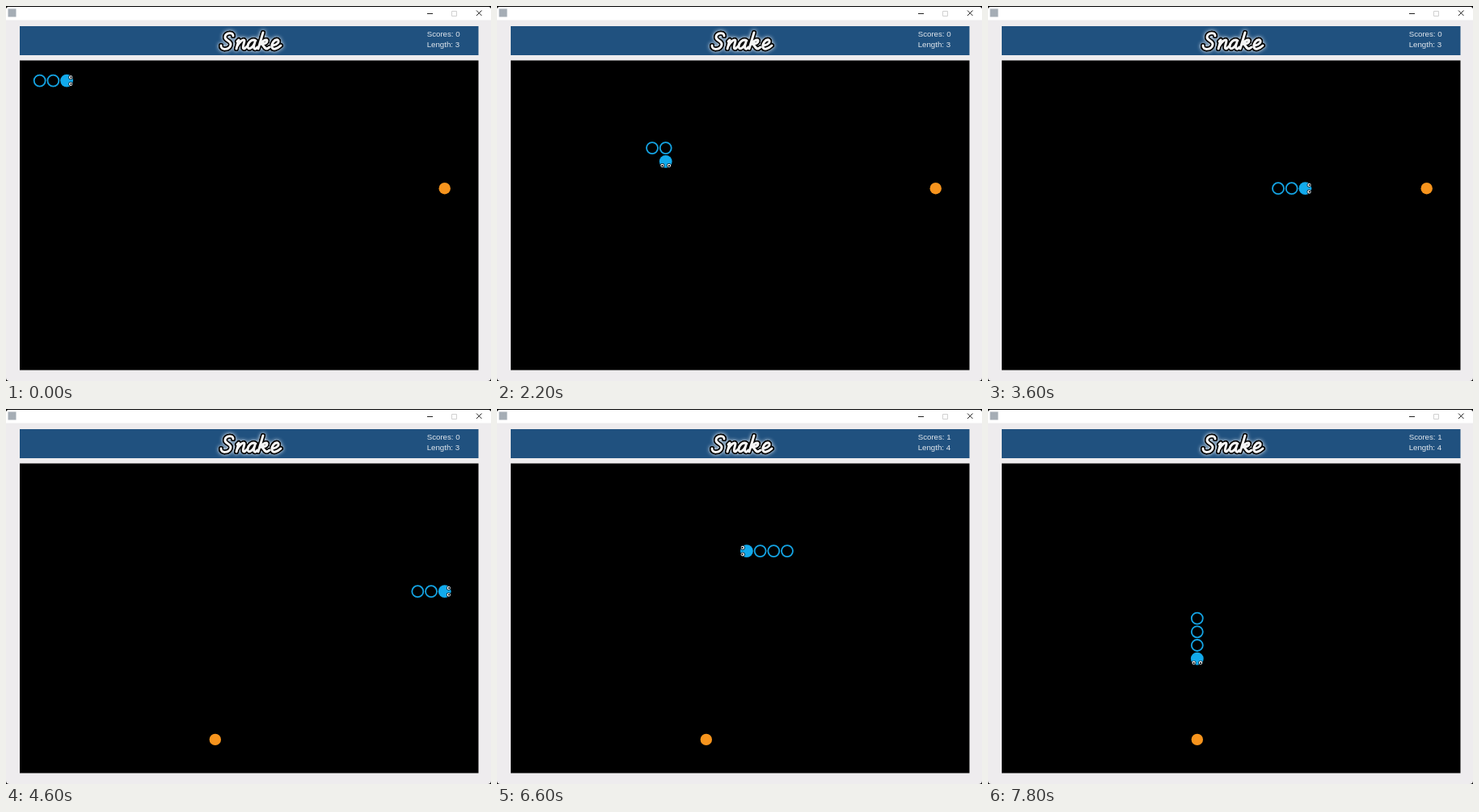
These frames come from a looping animation (600 px wide and 465 px high, 8000 ms). An HTML page with a canvas:

```html
<!DOCTYPE html>
<html lang="en">
<head>
<meta charset="utf-8">
<title>Snake</title>
<style>
html, body { margin: 0; width: 100%; height: 100%; overflow: hidden; background: #000; }
canvas { display: block; }
</style>
</head>
<body>
<canvas id="stage" width="600" height="465"></canvas>
<script>
const ctx = document.getElementById('stage').getContext('2d');
const LOOP = 8000, FRAME = 200, CELL = 16.7;
const DIRS = { R: [1, 0], L: [-1, 0], U: [0, -1], D: [0, 1] };
const ROUTE = [['R', 3], ['D', 5], ['R', 5], ['D', 3], ['R', 21], ['U', 3], ['L', 18], ['D', 9]];
const MEAL = 36;

const LETTERS = new Path2D(
  'M281 37C281 32 272 33 271 38C270 43 279 43 278 48C277 55 265 55 266 49' +
  'M286 44L288 42L285 53M286 50C288 45 294 40 295 43C295 46 291 53 295 53L298 50' +
  'M309 43C304 40 299 46 299 50C299 55 305 53 308 45C306 50 306 54 309 53L311 51' +
  'M318 33L312 53M314 48C318 42 324 40 323 44C322 47 318 47 316 47C319 48 319 53 323 53L326 51' +
  'M330 49C336 48 339 44 336 42C332 41 328 47 329 51C330 55 336 53 340 49');

// Every cell the head visits, starting with the initial body.
const trail = [[0, 0], [1, 0], [2, 0]].map(([x, y]) => ({ x, y, dir: 'R' }));
for (const [dir, count] of ROUTE) {
  for (let i = 0; i < count; i++) {
    const last = trail[trail.length - 1];
    trail.push({ x: last.x + DIRS[dir][0], y: last.y + DIRS[dir][1], dir });
  }
}

const centre = ({ x, y }) => [41.7 + x * CELL, 92.6 + y * CELL];

function box(x, y, w, h, color) {
  ctx.fillStyle = color;
  ctx.fillRect(x, y, w, h);
}

function disc(x, y, r, color) {
  ctx.fillStyle = color;
  ctx.beginPath();
  ctx.arc(x, y, r, 0, Math.PI * 2);
  ctx.fill();
}

function line(path, color, width) {
  ctx.strokeStyle = color;
  ctx.lineWidth = width;
  ctx.stroke(path);
}

function drawWindow() {
  box(0, 0, 600, 465, '#000');
  ctx.save();
  ctx.beginPath();
  ctx.roundRect(0, 1, 600, 464, 4);
  ctx.clip();
  box(0, 0, 600, 465, '#eeecee');
  box(0, 1, 600, 16.5, '#fff');
  ctx.restore();

  box(2.5, 3.5, 10, 10, '#a5adb5');
  line(new Path2D('M521 9.5H528'), '#222', 1);
  line(new Path2D('M551.5 6.5H557.5V12.5H551.5Z'), '#d0d0d0', 1);
  line(new Path2D('M582 5.5L588.5 12M588.5 5.5L582 12'), '#222', 1);

  box(17, 25, 567.5, 36, '#20517f');
  box(17, 67.5, 567.5, 384, '#000');
}

function drawTitle() {
  ctx.save();
  ctx.lineCap = ctx.lineJoin = 'round';
  ctx.shadowColor = '#fff';
  ctx.shadowBlur = 5;
  line(LETTERS, '#000', 6);
  ctx.shadowBlur = 0;
  line(LETTERS, '#000', 6);
  line(LETTERS, '#f4f4f4', 3);
  ctx.restore();
}

function drawLabels(score) {
  ctx.font = '9.7px "Liberation Sans", Arial, sans-serif';
  ctx.fillStyle = '#e2e8ee';
  ctx.fillText('Scores: ' + score, 520.7, 37.6);
  ctx.fillText('Length: ' + (score + 3), 520.7, 51);
}

function drawRing(cell) {
  const [x, y] = centre(cell);
  ctx.strokeStyle = '#14a4e4';
  ctx.lineWidth = 1.8;
  ctx.beginPath();
  ctx.arc(x, y, 7, 0, Math.PI * 2);
  ctx.stroke();
}

function drawHead(cell) {
  const [x, y] = centre(cell);
  const [dx, dy] = DIRS[cell.dir];
  disc(x, y, 7.9, '#12aaec');
  for (const side of [-4.2, 4.2]) {
    const ex = x + dx * 5 - dy * side, ey = y + dy * 5 + dx * side;
    disc(ex, ey, 2.8, '#0a1820');
    disc(ex, ey, 2.1, '#fff');
    disc(ex + dx * 0.4, ey + dy * 0.4, 1.1, '#000');
  }
}

function stepsAt(t) {
  if (t < 600) return 0;
  return Math.floor(t < 2200 ? 1 + (t - 600) / 120 : (t - 660) / 107.7);
}

function draw(now) {
  const t = Math.floor((now % LOOP) / FRAME) * FRAME;
  const step = stepsAt(t), head = step + 2;
  const score = step > MEAL ? 1 : 0;
  drawWindow();
  drawTitle();
  drawLabels(score);
  const food = step < MEAL ? { x: 30, y: 8 } : { x: 13, y: 19 };
  disc(...centre(food), 7.2, '#f7941d');
  trail.slice(head - 2 - score, head).forEach(drawRing);
  drawHead(trail[head]);
}

const start = performance.now();
function tick() {
  draw(performance.now() - start);
  requestAnimationFrame(tick);
}
tick();
</script>
</body>
</html>
```
